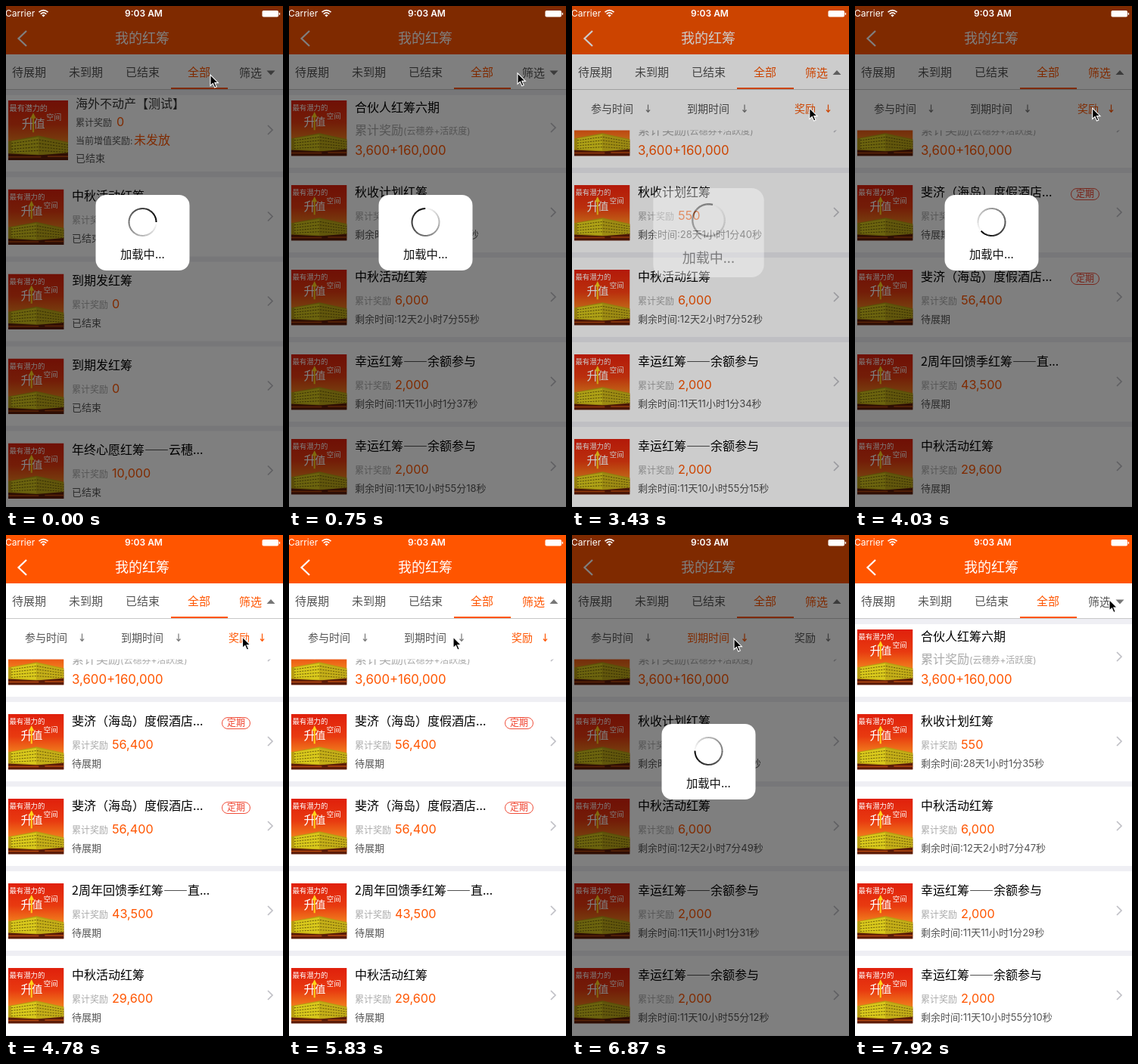
Animation, 366 px wide and 663 px high, one loop 8000 ms. Source, as an HTML page:

```html
<!DOCTYPE html>
<html lang="zh-CN">
<head>
<meta charset="utf-8">
<title>我的红筹</title>
<style>
html, body { margin: 0; width: 100%; height: 100%; overflow: hidden; background: #fff; }
svg { display: block; width: 366px; height: 663px; }
text { font-family: Inter, "Noto Sans CJK SC", "Noto Sans CJK", sans-serif; white-space: pre; }
.cjk { font-family: "Noto Sans CJK SC", "Noto Sans CJK", sans-serif; }
</style>
</head>
<body>
<svg id="stage" viewBox="0 0 366 663" xmlns="http://www.w3.org/2000/svg"></svg>
<script>
const LOOP = 8000, STEP = 149.4;
const ORANGE = '#ff5500', DARK = '#555', PALE = '#aaa', GAP = '#efeff4';
const ROW = 112;

const rect = (x, y, w, h, fill, extra = '') =>
  `<rect x="${x}" y="${y}" width="${w}" height="${h}" fill="${fill}" ${extra}/>`;
const line = (d, stroke, w, extra = '') =>
  `<path d="${d}" fill="none" stroke="${stroke}" stroke-width="${w}" ${extra}/>`;
// Text is placed by its left edge and its vertical middle.
const text = (x, mid, size, fill, str, extra = '') =>
  `<text x="${x}" y="${(mid + size * 0.37).toFixed(2)}" font-size="${size}" fill="${fill}" ${extra}>${str}</text>`;
const cjk = (x, mid, size, fill, str, extra = '') =>
  text(x, mid, size, fill, str, 'class="cjk" ' + extra);

function poster() {
  let windows = '';
  for (let i = 0; i < 4; i++) {
    windows += line(`M4 ${52.5 + i * 3.5}L37 ${48 + i * 4.4}L73 ${54.5 + i * 3}`, '#6b5a08', 1, 'stroke-dasharray="2 1.4"');
  }
  return `<linearGradient id="sky" x2="0" y2="1">
      <stop offset="0" stop-color="#e0200c"/><stop offset=".4" stop-color="#e83a10"/>
      <stop offset=".68" stop-color="#f07a1c"/><stop offset="1" stop-color="#7a2408"/>
    </linearGradient>
    <symbol id="poster" viewBox="0 0 73 73">
      ${rect(0, 0, 73, 73, 'url(#sky)')}
      <path d="M0 50L37 43L73 51V67H0Z" fill="#b89c10"/>
      <path d="M4 50L37 44.5V66L4 64Z" fill="#d8c81c"/>
      <path d="M37 44.5L73 52V65L37 66Z" fill="#c4ae18"/>
      ${windows}
      <path d="M0 65L37 67L73 64V73H0Z" fill="#5c1c08"/>
      ${line('M0 69H40M48 68.5H73', '#b84a12', 1.4)}
      ${cjk(1.5, 9.5, 9.3, '#fff', '最有潜力的')}
      ${cjk(46.5, 20.5, 9.3, '#fff', '空间')}
      ${cjk(16.5, 28, 16, '#fff', '升')}
      ${cjk(31, 28, 14, '#fff', '值')}
      ${line('M30.5 39V20', '#ffd21c', 2)}
      <path d="M27 22L30.5 15L34 22Z" fill="#ffd21c"/>
    </symbol>`;
}

const picture = (y, size) => `<use href="#poster" x="3" y="${y}" width="${size}" height="${size}"/>`;
const chevron = mid => line(`M346 ${mid - 6}l6 6l-6 6`, '#c0c0c6', 1.7);
const badge = mid =>
  rect(285.5, mid - 7.5, 37, 15, 'none', 'rx="7.5" stroke="#f0503c"') + cjk(292, mid, 12, '#f0402c', '定期');

function card(top, { title, value, status = '', timer, tag }) {
  const attr = timer ? `data-lead="${timer[0]}" data-sec="${timer[1]}"` : '';
  return rect(0, top, 366, 105, '#fff') + picture(top + 16, 73.5) +
    cjk(87, top + 25, 16, '#000', title) +
    cjk(87, top + 57.3, 12, PALE, '累计奖励') +
    text(140, top + 56, 16.2, ORANGE, value) +
    text(87, top + 81, 13, DARK, status, attr) +
    chevron(top + 52) + (tag ? badge(top + 28) : '');
}
const cards = (top, rows) => rows.map((r, i) => card(top + i * ROW, r)).join('');

const partnerCard = rect(0, 118, 366, 96, '#fff') + picture(125, 73.5) +
  cjk(87, 134, 16, '#000', '合伙人红筹六期') +
  cjk(87, 164, 16, PALE, '累计奖励') +
  text(151, 165.5, 12, PALE, '(云穗券+活跃度)') +
  text(87, 191, 16.8, ORANGE, '3,600+160,000') + chevron(161);

const overseasCard = rect(0, 118, 366, 101, '#fff') + picture(125, 79) +
  cjk(92, 129, 16, '#333', '海外不动产【测试】') +
  cjk(92, 155, 12, DARK, '累计奖励') + text(146, 153.5, 16.2, ORANGE, '0') +
  text(92, 178.5, 12, DARK, '当前增值奖励:') + cjk(169, 177, 16, ORANGE, '未发放') +
  cjk(92, 201.5, 13, DARK, '已结束') + chevron(164);

const ended = (title, value) => ({ title, value, status: '已结束' });
const waiting = (title, value, tag) => ({ title, value, status: '待展期', tag });
const running = (title, value, lead, sec) => ({ title, value, timer: ['剩余时间:' + lead, sec] });

const lists = {
  ended: overseasCard + cards(226.5, [
    ended('中秋活动红筹', '0'), ended('到期发红筹', '0'), ended('到期发红筹', '0'),
    ended('年终心愿红筹——云穗...', '10,000')]),
  running: partnerCard + cards(221, [
    running('秋收计划红筹', '550', '28天1小时1分', 41),
    running('中秋活动红筹', '6,000', '12天2小时7分', 53),
    running('幸运红筹——余额参与', '2,000', '11天11小时1分', 35),
    running('幸运红筹——余额参与', '2,000', '11天10小时55分', 16)]),
  waiting: partnerCard + cards(221, [
    waiting('斐济（海岛）度假酒店...', '56,400', true),
    waiting('斐济（海岛）度假酒店...', '56,400', true),
    waiting('2周年回馈季红筹——直...', '43,500'),
    waiting('中秋活动红筹', '29,600')])
};

const sortItem = ([x, label, arrow]) =>
  `<g class="sort" fill="${DARK}" stroke="#777">
    ${cjk(x, 136, 14, 'inherit', label, 'stroke="none"').replace('fill="inherit"', '')}
    ${line(`M${arrow} 130.5V140M${arrow - 2.5} 137.5L${arrow} 140.3L${arrow + 2.5} 137.5`, 'inherit', 1.2).replace('stroke="inherit"', '')}
  </g>`;

const header = rect(0, 0, 366, 64, ORANGE) +
  line('M27 33L16.5 43L27 53', '#fff', 2.2) +
  cjk(144, 42, 18, '#fff', '我的红筹', 'font-weight="500"');

const tabs = rect(0, 64, 366, 46, '#fff') + rect(0, 110, 366, 1, '#c8c8c8') +
  [[8, '待展期'], [83, '未到期'], [158, '已结束']].map(([x, s]) => cjk(x, 87, 15, DARK, s)).join('') +
  cjk(240, 87, 15, ORANGE, '全部') + rect(218, 108, 75, 2, ORANGE) +
  cjk(308, 88, 15, DARK, '筛选', 'id="filter"') + '<path id="caret" fill="#777"/>';

function ring() {
  const n = 48, r = 18;
  const at = i => {
    const a = -i / n * 2 * Math.PI;
    return `${(r * Math.cos(a)).toFixed(2)} ${(r * Math.sin(a)).toFixed(2)}`;
  };
  let out = '';
  for (let i = 0; i < n; i++) {
    out += line(`M${at(i)}A18 18 0 0 0 ${at(i + 1.1)}`, '#000', 2, `opacity="${(1 - i / n).toFixed(2)}"`);
  }
  return out;
}

const hud = rect(-62, -50, 124, 100, '#fff', 'rx="14"') +
  `<g transform="translate(0 -14)"><g id="ring">${ring()}</g></g>` +
  cjk(-29.5, 28, 15.3, '#111', '加载中...');

const statusBar = text(-1, 10, 12, '#fff', 'Carrier') +
  line('M43.5 8.2Q49.5 3 55.5 8.2M45.7 10.6Q49.5 7.2 53.3 10.6', '#fff', 1.6) +
  '<path d="M47.3 12.2Q49.5 10.2 51.7 12.2L49.5 14.6Z" fill="#fff"/>' +
  text(182, 10, 12, '#fff', '9:03 AM', 'font-weight="600" text-anchor="middle"') +
  rect(338.5, 6, 21.5, 8.5, '#fff', 'rx="1.8"') + rect(360.7, 8.7, 1.4, 3.2, '#fff', 'rx=".7"');

const stage = document.getElementById('stage');
stage.innerHTML = `<defs>${poster()}</defs>` + rect(0, 0, 366, 663, GAP) +
  Object.entries(lists).map(([id, s]) => `<g id="${id}">${s}</g>`).join('') +
  `<g id="bar">${rect(0, 111, 366, 53.5, '#fff')}<g id="sorts">` +
  [[25, '参与时间', 100.5], [152, '到期时间', 228], [294, '奖励', 338.5]].map(sortItem).join('') +
  `</g></g>` + header + tabs +
  rect(0, 0, 366, 663, '#000', 'id="shade"') + `<g id="hud">${hud}</g>` + statusBar +
  `<path id="cursor" d="M0 0V14.5L3.4 11.4L5.8 17L8.2 16L5.8 10.6H10.4Z" fill="#000" stroke="#fff" stroke-width="1.1"/>`;

const el = id => document.getElementById(id);
const show = (node, on) => node.setAttribute('visibility', on ? 'visible' : 'hidden');
const timers = [...stage.querySelectorAll('[data-sec]')];
const sorts = [...stage.querySelectorAll('.sort')];

const cursorPath = [[0, 270, 91], [3, 270, 91], [7, 334, 86.5], [13, 333.5, 86.5], [18, 314, 135],
  [31, 313.5, 135], [32, 312.5, 135], [38, 221, 135], [40, 213, 135], [42, 213, 135.5],
  [46, 214, 137], [49, 335.5, 84], [50, 336, 85.5], [54, 336, 85.5]];
// first step, step of disappearance, progress of first step, head angle at first step
const loadings = [[0, 7, 1, 0], [23, 29, 0.4, -75], [42, 49, 0.4, -34]];
const listAt = [[0, 'ended'], [4, 'running'], [27, 'waiting'], [46, 'running']];
const OPEN = 13, CLOSE = 53;

function cursorAt(n) {
  const i = Math.max(1, cursorPath.findIndex(k => k[0] >= n));
  const [a, x0, y0] = cursorPath[i - 1], [b, x1, y1] = cursorPath[i];
  const p = (n - a) / (b - a);
  return [x0 + (x1 - x0) * p, y0 + (y1 - y0) * p];
}

function drawLoading(n) {
  const span = loadings.find(l => n >= l[0] && n < l[1]);
  show(el('hud'), span);
  show(el('shade'), span);
  if (!span) return;
  const [first, end, start, angle] = span;
  let alpha = 1, scale = 1;
  if (n === first) {
    alpha = start;
    scale = 1.3 - 0.3 * alpha;
  } else if (n === end - 1) {
    alpha = 0.5;
    scale = 0.9;
  }
  el('shade').setAttribute('opacity', 0.5 * alpha);
  el('hud').setAttribute('opacity', alpha);
  el('hud').setAttribute('transform', `translate(180.5 300) scale(${scale})`);
  el('ring').setAttribute('transform', `rotate(${angle + (n - first) * STEP * 0.36})`);
}

function draw(n) {
  const current = listAt.filter(l => l[0] <= n).pop()[1];
  for (const id in lists) show(el(id), id === current);

  const ticks = Math.floor((n * STEP - 1900) / 1000);
  for (const t of timers) t.textContent = t.dataset.lead + (t.dataset.sec - ticks) + '秒';

  const open = n >= OPEN && n < CLOSE;
  show(el('bar'), open);
  show(el('sorts'), open && n > OPEN);
  el('filter').setAttribute('fill', open ? ORANGE : DARK);
  el('caret').setAttribute('d', open ? 'M344.5 91L350 85L355.5 91Z' : 'M344.5 85.5L350 91.5L355.5 85.5Z');
  const chosen = n >= 42 ? 1 : n >= 23 ? 2 : -1;
  sorts.forEach((g, i) => {
    g.setAttribute('fill', i === chosen ? ORANGE : DARK);
    g.setAttribute('stroke', i === chosen ? ORANGE : '#777');
  });

  drawLoading(n);
  el('cursor').setAttribute('transform', `translate(${cursorAt(n)})`);
}

let last = -1;
function tick() {
  const n = Math.floor((performance.now() % LOOP + 8) / STEP);
  if (n !== last) draw(last = n);
  requestAnimationFrame(tick);
}
tick();
</script>
</body>
</html>
```
